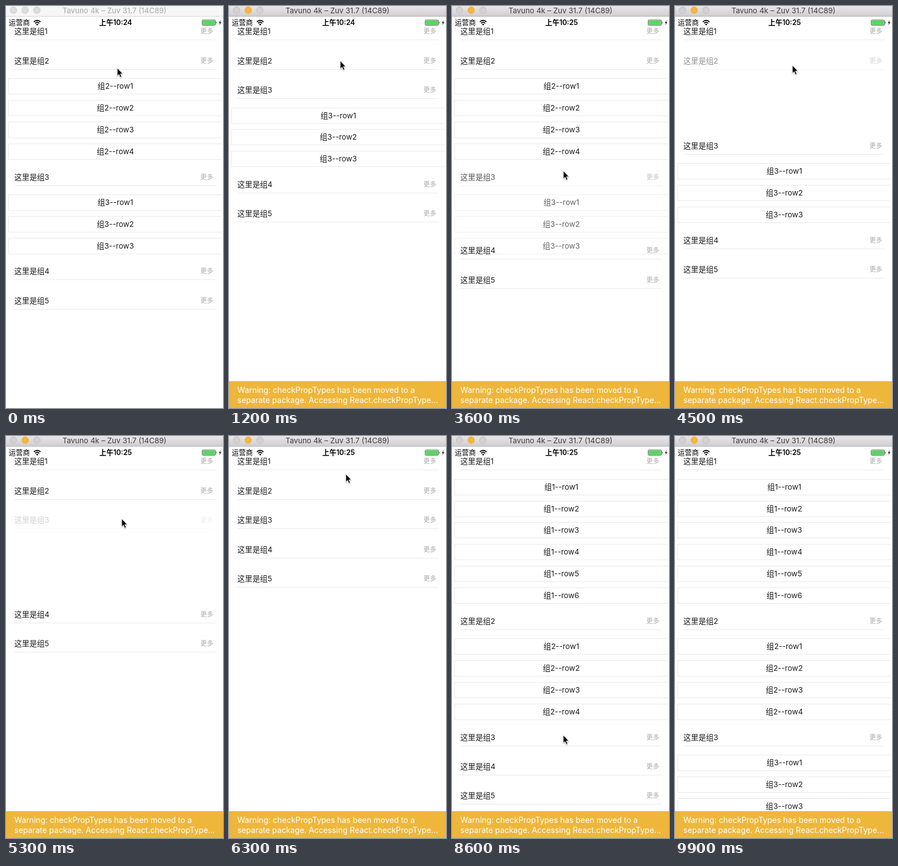
Animation of 390 by 719 pixels, one loop 10 s. Source, as an HTML page:

```html
<!DOCTYPE html>
<html lang="zh">
<head>
<meta charset="utf-8">
<title>Collapsible groups</title>
<style>
html, body { margin: 0; width: 100%; height: 100%; overflow: hidden; background: #fff; }
body { font-family: Inter, "Noto Sans CJK SC", "Noto Sans CJK", sans-serif; color: #1c1c1c; }
#stage { position: relative; width: 390px; height: 719px; overflow: hidden; background: #fff; }
#stage div, #stage svg, #stage span { position: absolute; box-sizing: border-box; white-space: nowrap; }
#bar { left: 0; top: 0; width: 390px; height: 19px; background: #f6f6f6; border-bottom: 1px solid #d6d6d6; color: #a9a9a9; }
#bar.active { background: linear-gradient(#e8e6e8, #d0ced0); border-color: #b5b3b5; color: #3e3e3e; }
#title { left: 0; width: 390px; top: 0; line-height: 17px; font-size: 13.4px; text-align: center; }
#bar .dot { width: 13px; height: 13px; top: 1px; border-radius: 50%; background: #dcdcdc; border: 1px solid #cdcdcd; }
#bar.active .dot { background: #d3d1d3; border-color: #bfbdbf; }
#bar.active .mid { background: #f4b63f; border-color: #eeb03c; }
.status { top: 20px; line-height: 20px; font-size: 12.6px; color: #000; }
.head { left: 15px; width: 362px; height: 31px; border-bottom: 1px solid #e9e9e9; line-height: 30px; font-size: 13.6px; }
.head span { left: 0; top: 0; }
.head .more { left: auto; right: 4.5px; font-size: 11.5px; color: #a8a8a8; }
.row { left: 4px; width: 384px; height: 29px; border: 1px solid #e8e8e8; border-right: 0; line-height: 27px; font-size: 13.6px; text-align: center; }
#warn { left: 0; top: 671px; width: 390px; height: 48px; padding: 7px 0 0 15px; background: rgba(238, 181, 52, .96); color: #fff; font-size: 14.2px; line-height: 18px; }
#cursor { left: 0; top: 0; filter: drop-shadow(0 1px 1px rgba(0, 0, 0, .35)); }
</style>
</head>
<body>
<div id="stage">
  <div id="list"></div>
  <div class="status" style="left:5px">运营商</div>
  <svg style="left:49px;top:24px" width="14" height="12" viewBox="0 0 14 12" fill="none" stroke="#000" stroke-width="1.8">
    <path d="M1 4.4Q7 -.9 13 4.4M3.2 6.9Q7 3.6 10.8 6.9"/>
    <path d="M7 11L4.9 8.8Q7 7.2 9.1 8.8Z" fill="#000" stroke="none"/>
  </svg>
  <div class="status" id="clock" style="left:117px;width:160px;text-align:center;font-weight:600"></div>
  <svg style="left:352px;top:24px" width="37" height="12" viewBox="0 0 37 12">
    <rect x=".5" y=".9" width="24" height="9.6" rx="1.6" fill="#fff" stroke="#222" stroke-width=".7"/>
    <rect x="1.3" y="1.7" width="22.4" height="8" rx=".9" fill="#58d662"/>
    <path d="M25.6 3.8q2.2 2 0 4z" fill="#222"/>
    <path d="M34 1L30.5 6.2H32.6L31.2 10.5L35 5H32.8Z" fill="#111"/>
  </svg>
  <div id="bar">
    <div class="dot" style="left:7px"></div>
    <div class="dot mid" style="left:28px"></div>
    <div class="dot" style="left:49px"></div>
    <div id="title">Tavuno 4k – Zuv 31.7 (14C89)</div>
  </div>
  <div id="warn">Warning: checkPropTypes has been moved to a<br>separate package. Accessing React.checkPropType...</div>
  <svg id="cursor" width="14" height="20" viewBox="-1 -1 14 20">
    <path d="M0 0V14.2L3.2 11.3L5.5 16.6L7.9 15.5L5.6 10.4H9.8Z" fill="#000" stroke="#fff" stroke-width=".9"/>
  </svg>
</div>
<script>
const LOOP = 10000, STEP = 100;
const FIRST = 45.3, HEAD = 52.4, ROW = 38.85, SLIDE = 300;
const rowCounts = [6, 4, 3, 0, 0];
const openAtStart = [0, 1, 1, 0, 0];

// time, group index, opens
const taps = [
  [520, 1, 0], [1650, 1, 1], [2764, 2, 0], [3420, 2, 1], [4373, 1, 0],
  [5300, 2, 0], [6650, 0, 1], [7710, 1, 1], [8750, 2, 1]
];

// time, x, y of the pointer tip
const path = [
  [0, 200, 111], [400, 200, 98], [1900, 200, 98], [2500, 200, 297],
  [3550, 200, 297], [4200, 211, 106], [4700, 211, 106], [5150, 208, 148],
  [5500, 208, 148], [6300, 210, 68], [6500, 210, 48], [6850, 210, 48],
  [7450, 201, 326], [7950, 201, 326], [8500, 200, 535], [9000, 200, 535],
  [9600, 200, -22], [LOOP, 200, -22]
];

const $ = id => document.getElementById(id);
const clamp = v => Math.max(0, Math.min(1, v));
const ease = p => p < .5 ? 2 * p * p : 1 - 2 * (1 - p) * (1 - p);
const mix = (a, b, p) => a + (b - a) * p;

function add(parent, tag, cls, text) {
  const el = document.createElement(tag);
  el.className = cls;
  el.textContent = text;
  return parent.appendChild(el);
}

const groups = rowCounts.map((count, g) => {
  const head = add($('list'), 'div', 'head', '');
  add(head, 'span', '', `这里是组${g + 1}`);
  add(head, 'span', 'more', '更多');
  const rows = Array.from({ length: count }, (_, i) =>
    add($('list'), 'div', 'row', `组${g + 1}--row${i + 1}`));
  return { head, rows };
});

function groupState(g, t) {
  let open = openAtStart[g], amount = open, alpha = 1;
  for (const [at, group, opens] of taps) {
    if (group !== g) continue;
    if (t >= at) {
      const p = ease(clamp((t - at) / SLIDE));
      amount = mix(open, opens, p);
      alpha = mix(.2, 1, p);
      open = opens;
    } else if (t > at - 120) {
      alpha = mix(1, .2, clamp((t - at + 120) / 60));
    }
  }
  return { open, amount, alpha };
}

function pointer(t) {
  const i = path.findIndex(k => k[0] > t);
  const [t0, x0, y0] = path[i - 1], [t1, x1, y1] = path[i];
  const p = ease((t - t0) / (t1 - t0));
  return [mix(x0, x1, p), mix(y0, y1, p)];
}

function draw(t) {
  let y = FIRST;
  groups.forEach(({ head, rows }, g) => {
    const { open, amount, alpha } = groupState(g, t);
    head.style.top = Math.round(y - 15) + 'px';
    head.style.opacity = alpha;
    rows.forEach((row, i) => {
      row.style.top = Math.round(y + 31.4 + i * ROW) + 'px';
      // closing rows vanish at once, opening rows fade in
      row.style.opacity = open ? amount : 0;
    });
    y += HEAD + rows.length * ROW * amount;
  });
  $('bar').classList.toggle('active', t >= 300);
  $('warn').style.visibility = t >= 600 ? 'visible' : 'hidden';
  $('clock').textContent = t < 3600 ? '上午10:24' : '上午10:25';
  const [px, py] = pointer(t);
  $('cursor').style.transform = `translate(${px - 1}px, ${py - 1}px)`;
}

const start = performance.now();
function tick() {
  const t = (performance.now() - start) % LOOP;
  draw(Math.floor(t / STEP) * STEP);
  requestAnimationFrame(tick);
}
draw(0);
requestAnimationFrame(tick);
</script>
</body>
</html>
```
